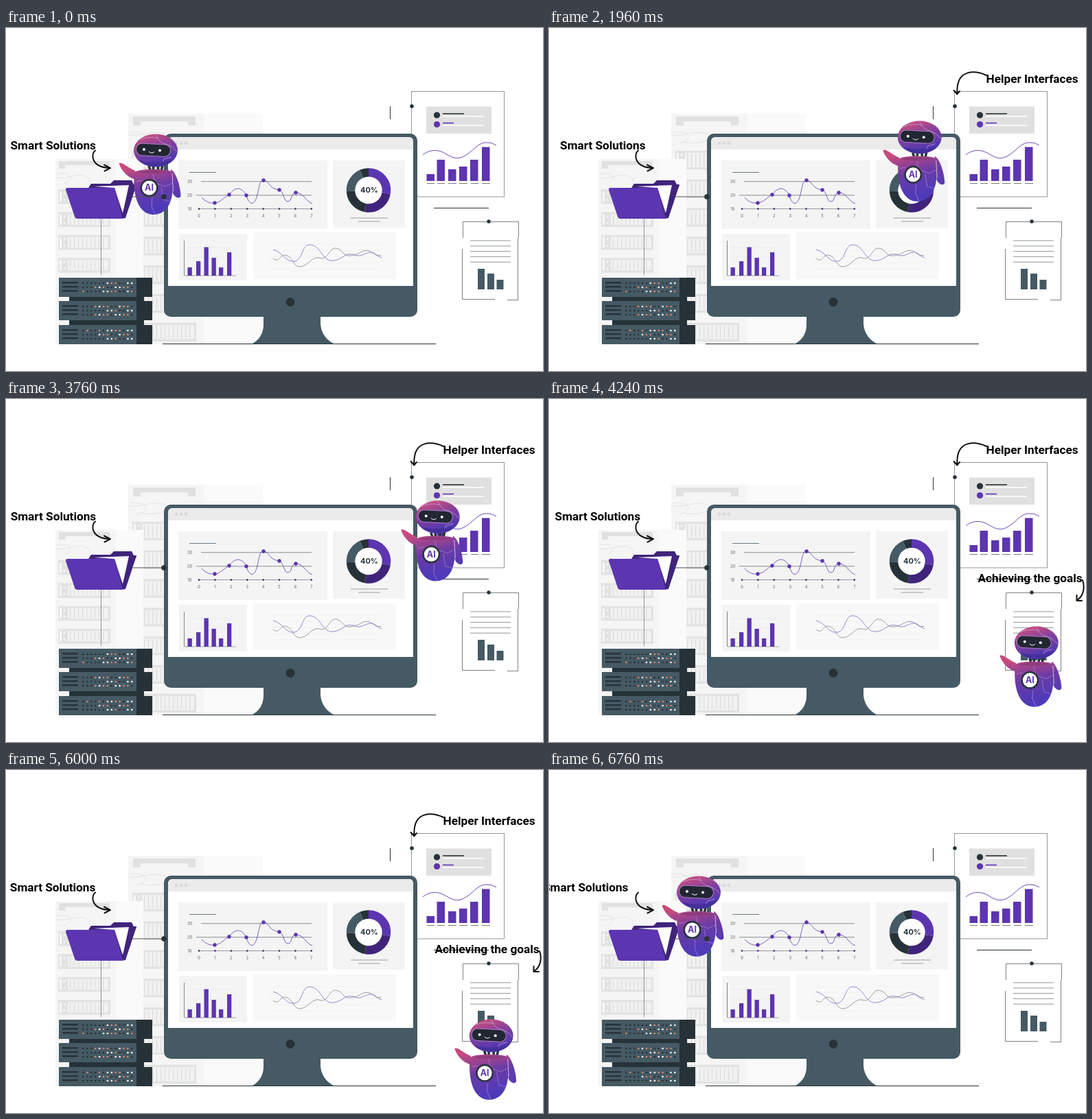
Animation of 782x500 px, one loop 6800 ms. Source, as an HTML page:

```html
<!DOCTYPE html>
<html lang="en">
<head>
<meta charset="utf-8">
<title>Smart Solutions</title>
<style>
  html, body { margin: 0; width: 100%; height: 100%; overflow: hidden; background: #fff; }
  svg { display: block; }
  .label { font: 700 17.2px Roboto, "Open Sans", sans-serif; fill: #000; }
  .tick { font: 500 5.6px Inter, sans-serif; fill: #6b777d; text-anchor: middle; }
  .bold { font: 700 11px Inter, sans-serif; text-anchor: middle; }
  .arrow { fill: none; stroke: #111; stroke-width: 2; stroke-linecap: round; stroke-linejoin: round; }
</style>
</head>
<body>
<svg id="stage" width="782" height="500" viewBox="0 0 782 500"></svg>
<script>
const SLATE = '#455a64', DARK = '#263238', PURPLE = '#5c35b0', DEEP = '#40247c';

const rect = (x, y, w, h, fill, more = '') =>
  `<rect x="${x}" y="${y}" width="${w}" height="${h}" fill="${fill}" ${more}/>`;
const dot = (x, y, r, fill = DARK) => `<circle cx="${x}" cy="${y}" r="${r}" fill="${fill}"/>`;
const fill = (d, color) => `<path d="${d}" fill="${color}"/>`;
const line = (d, color = DARK, width = 1) =>
  `<path d="${d}" fill="none" stroke="${color}" stroke-width="${width}"/>`;
const text = (x, y, s, cls, more = '') => `<text x="${x}" y="${y}" class="${cls}" ${more}>${s}</text>`;
const repeat = (n, f) => Array.from({ length: n }, (_, i) => f(i)).join('');
// each bar is [x, top]
const bars = (list, base, width, color) =>
  list.map(([x, top]) => rect(x, top, width, base - top, color)).join('');

function rackUnit(x, y, w, h) {
  const n = Math.floor((w - 25) / 6);
  return rect(x, y, w, h, '#e1e2e2') + rect(x + 2, y + 3, 3, h - 6, '#f7f7f7') +
    dot(x + 9, y + 6, 1.5, '#f7f7f7') + dot(x + 9, y + h - 6, 1.5, '#f7f7f7') +
    rect(x + 14, y + 3, w - 17, h - 6, '#f1f1f1') +
    repeat(n + 1, i => rect(x + 17 + i * 6, y + 4, 1.2, h - 8, '#dcdddd'));
}

function racks() {
  return rect(288, 125, 86, 336, '#fafafa') + rect(178, 125, 110, 336, '#f5f5f5') +
    fill('M185 129H276V142H265V136H196V142H185z', '#e0e1e1') +
    line('M180 152C205 147 212 164 190 168M178 156C200 158 212 148 232 154M196 166Q215 170 230 164', '#e4e4e4') +
    repeat(7, i => rackUnit(184, 179 + i * 41.8, 93, 27)) +
    rect(160, 191, 40, 270, '#fafafa') + rect(72, 191, 88, 270, '#f5f5f5') +
    fill('M77 194H151V205H142V200H86V205H77z', '#e0e1e1') +
    line('M74 213C95 208 100 222 84 227M73 218C92 222 108 207 122 220V236', '#e4e4e4') +
    repeat(4, i => rackUnit(76, 235 + i * 33.4, 76, 21.5));
}

function server(y, row) {
  return rect(77, y, 113, 28, SLATE) + rect(190, y, 23, 28, DARK) +
    repeat(3, i => rect(82, y + 6 + i * 6, 23, 2.4, DARK)) +
    repeat(39, i => {
      const c = i % 13, k = (i * 7 + row * 5 + (i >> 2)) % 9;
      const color = c < 4 || k < 3 ? (k === 8 ? '#ee7d66' : DARK) : k < 6 ? '#ee7d66' : '#fff';
      return dot(112.5 + c * 5.9, y + 8 + Math.floor(i / 13) * 6, 1.35, color);
    });
}

function servers() {
  return rect(92, 390, 109, 46, DARK) + [364, 398, 433].map(server).join('');
}

function folder() {
  return line('M138.5 278V360', '#8b9195') +
    fill('M120 233L124 227H152L157 222H183L186 228H190L174 277L166 278z', DEEP) +
    fill('M128 231L179 229L170 270L158 233z', '#fff') +
    line('M160 232L177 230.5', '#d8d8df', .8) +
    fill('M180 229H190C183 246 180 264 171 278L169 272C174 258 178 245 180 229z', DEEP) +
    fill('M89 233H155Q158 233 159 236L170 278H104Q101 278 100 275L87 236Q87 233 89 233z', PURPLE);
}

function monitor() {
  return fill('M375 415H458V432Q460 452 479 461H357Q375 452 375 432z', SLATE) +
    line('M228 460.5H626') +
    rect(230, 154, 369, 267, SLATE, 'rx="10"') +
    fill('M236 166Q236 159 243 159H586Q593 159 593 166V376H236z', '#fff') +
    fill('M236 177V166Q236 159 243 159H586Q593 159 593 166V177z', '#ebebeb') +
    [248, 255, 262].map(x => dot(x, 168, 2.4, '#dadada')).join('') +
    dot(414, 399.5, 6.5);
}

function lineChart() {
  const points = [[304, 255], [325, 243], [350, 244], [375, 222], [398, 236], [422, 240]];
  return rect(251, 193, 217, 100, '#f4f4f4') + line('M267 210.5H306', SLATE, .8) +
    line('M284 223.8H445M277 243.8H445', '#7d8488', .9) + line('M281 263.6H445', '#8b8b93', .9) +
    [30, 20, 10].map((n, i) => text(267.5, 226 + i * 20, n, 'tick')).join('') +
    repeat(8, i => text(281 + i * 23.4, 276, i, 'tick') + dot(281 + i * 23.4, 263.6, 1.3, DEEP)) +
    line('M285 247C290 253 297 256 304 255C313 254 317 247 325 243C334 230 344 232 350 244' +
      'C354 259 362 260 366 243C370 226 370 222 375 222C384 223 382 234 398 236' +
      'C405 238 404 254 411 253C417 252 414 241 422 240C434 240 436 253 446 256', PURPLE, .8) +
    points.map(([x, y]) => dot(x, y, 2.7, PURPLE)).join('');
}

function donut() {
  const parts = [[0, 100, PURPLE], [100, 190, DEEP], [190, 267, DARK], [267, 337, SLATE], [337, 360, DARK]];
  const at = a => {
    const r = a * Math.PI / 180;
    return `${528 + 26 * Math.sin(r)} ${236.5 - 26 * Math.cos(r)}`;
  };
  return rect(476, 193, 105, 98, '#f4f4f4') + dot(528, 236.5, 21, '#fff') +
    parts.map(([a, b, c]) => line(`M${at(a)}A26 26 0 0 1 ${at(b)}`, c, 12.5)).join('') +
    text(529, 240, '40%', 'bold', `fill="${DARK}"`) +
    line('M502 277H556M513 282H545', '#9a9fa2');
}

function smallCharts() {
  return rect(252, 300, 99, 68, '#f4f4f4') +
    line('M259.5 310V361', '#777', .9) + line('M260 361H335', '#9a9a9a', .9) +
    line('M264 320H335M264 334H335M264 348H335', '#ebebeb') +
    bars([[264.5, 349], [277, 340], [288.5, 319.5], [299.5, 335], [310, 349], [322, 327]], 361, 6.3, PURPLE) +
    rect(360, 298, 208, 68, '#f8f8f8') +
    repeat(5, i => line(`M383 ${315 + i * 9}H548`, '#f1f1f1')) +
    line('M389 323C404 327 407 342 420 340C433 338 430 315 443 316C459 317 460 341 477 339' +
      'C492 337 492 327 506 330C518 337 526 323 536 328Q542 333 547 335', '#8467c8', .8) +
    line('M389 336C399 343 397 331 407 331C418 333 418 349 429 348C441 346 445 333 456 335' +
      'C468 340 470 322 479 321C491 321 489 333 502 332C516 330 520 322 529 325C536 327 538 334 546 331', '#7f898e', .8);
}

function chartPage() {
  return line('M559.5 114V133') + line('M623 262.5H703') +
    rect(590.5, 92.5, 135, 153.5, '#fff', 'stroke="#777d81" stroke-width=".8"') +
    dot(591, 114, 2.8) +
    rect(612, 114.5, 95, 39.5, '#e0e0e0') + dot(627.5, 127, 4.6) + dot(627.5, 140.5, 4.6, PURPLE) +
    line('M636 125H667', DARK, 1.6) + line('M636 138.5H652', PURPLE, 1.6) +
    line('M636 128.8H696M636 142H696', '#fff', 1.6) +
    bars([[612.5, 213], [627.5, 192], [644, 206], [660, 202], [676, 192], [693, 173.5]], 223, 11.5, PURPLE) +
    line('M613 226.5H624M628 226.5H639M644 226.5H656M660 226.5H672M677 226.5H688M693 226.5H705', '#777') +
    line('M607 185C615 178 627 176 638 182C648 188 656 193 667 187C680 180 686 168 698 167Q707 166 714 171',
      PURPLE, .9);
}

function textPage() {
  return rect(665, 282, 81, 114, '#fff') +
    line('M665.5 306V282.5H746.5V306M745.5 306V396M664.5 322V395.5H712M730 396.5H746', '#5c6367', .8) +
    dot(703, 282, 2.7) +
    repeat(5, i => line(`M676 ${310 + i * 7.8}H735`, '#858b8e', .9)) +
    bars([[687, 351], [701, 358], [714.5, 367]], 381, 10, SLATE);
}

function robot() {
  const body = 'url(#body)';
  return fill('M164.5 197.5C168 194 175 202 188 208L190 221C181 220 169 211 164.5 197.5z', body) +
    fill('M240 206C247 209 254 230 254.5 245C252 250 246 247 243 241z', body) +
    line('M208 201L210 207M214.5 201V208M221.5 201V208M228 200L226.5 207', DARK, 3.5) +
    fill('M187 211Q190 206 214 206Q238 206 242 210C246 243 240 272 214 272C192 271 184 243 187 211z', body) +
    fill('M190 210.5Q214 204 240 210Q214 214 190 210.5z', '#8d3c7c') +
    line('M242 212L243.5 238', '#e4d9f2', .8) +
    line('M214 213L217 226L232 231L242 226M226 232L229 250L239 253M213 247L212 260L217 271M189 224L198 222',
      '#a58ad6', .7) +
    '<ellipse cx="218" cy="178.5" rx="32" ry="24" fill="url(#head)"/>' +
    line('M217 155C222 160 221 165 229 168C241 171 244 176 249 180M241 188L230 191L227 200M195 163Q208 157 222 161',
      '#c99bd2', .8) +
    fill('M194 193Q218 199 243 192Q235 202 218 202Q203 202 194 193z', '#44309c') +
    rect(189, 168.5, 51, 18.5, '#a97fc4', 'rx="9" transform="rotate(3 214 178)"') +
    rect(190, 169.5, 49, 16.5, '#222633', 'rx="8" transform="rotate(3 214 178)"') +
    dot(201, 177, 2, '#fff') + dot(224, 178.5, 2, '#fff') +
    line('M208 180Q212 184 216 180.5', '#fff', 1) +
    dot(208.5, 233, 13) + dot(208.5, 233, 10.5, '#fff') +
    text(208.5, 237.4, 'AI', 'bold', `fill="${PURPLE}" style="font-size:12.5px"`);
}

const gradient = (id, y1, y2, top, mid, low) =>
  `<linearGradient id="${id}" gradientUnits="userSpaceOnUse" x1="206" x2="220" y1="${y1}" y2="${y2}">
    <stop stop-color="${top}"/><stop offset=".5" stop-color="${mid}"/><stop offset="1" stop-color="${low}"/>
  </linearGradient>`;
const wipeClip = (id, x, y, h) => `<clipPath id="${id}"><rect x="${x}" y="${y}" width="0" height="${h}"/></clipPath>`;
const arrow = d => `<path class="arrow" d="${d}"/>`;

stage.innerHTML = `<defs>
  ${gradient('head', 154, 200, '#cf4f7d', '#7f3f9f', '#4b37b2')}
  ${gradient('body', 199, 262, '#c64a7e', '#6a3ba6', '#4f3ab8')}
  ${wipeClip('helperClip', 586, 55, 50)}${wipeClip('goalsClip', 622, 245, 55)}</defs>` +
  racks() + servers() + folder() + chartPage() + monitor() + lineChart() + donut() + smallCharts() +
  textPage() +
  `<g id="bot">${robot()}</g>` +
  line('M183 246H230', '#4c5358') + dot(230, 246, 3.8) +
  arrow('M130 178.5C123 184 124 203 151 204M143 199.5L152 204.2L143.5 208.5') +
  text(6.5, 177, 'Smart Solutions', 'label', 'id="smart"') +
  `<g clip-path="url(#helperClip)">${arrow('M637 69C622 62 592 58 594.5 96M589.5 91L594.5 96.5L598 92')}
    ${text(636.5, 80, 'Helper Interfaces', 'label')}</g>
  <g clip-path="url(#goalsClip)">${arrow('M777 264C781 275 778 288 769 293M768.5 286V294H776')}
    ${text(624.5, 267, 'Achieving the goals', 'label')}</g>`;

const LOOP = 6800, STEP = 40, MOVE = 780;
const spots = [[0, 0], [403, -24], [510, 218]];
// lead: progress already made on the first step; drift: how far the first label slides before it snaps back
const moves = [
  { start: 1480, lead: 36, drift: 12 },
  { start: 3760, lead: 60, drift: 2.5 },
  { start: 6000, lead: 36, drift: -15.5 },
];
const bot = document.getElementById('bot'), smart = document.getElementById('smart');
const helperBox = document.querySelector('#helperClip rect'), goalsBox = document.querySelector('#goalsClip rect');
const clamp = v => Math.max(0, Math.min(1, v));
const ease = u => 0.85 * u * (1 - u) ** 2 + u * u * (3 - 2 * u);

function draw(now) {
  const t = Math.floor(now % LOOP / STEP) * STEP;
  let [x, y] = spots[0], shift = 0;
  moves.forEach(({ start, lead, drift }, i) => {
    if (t < start) return;
    const p = ease(clamp((t - start + lead) / MOVE));
    const a = spots[i], b = spots[(i + 1) % 3];
    x = a[0] + (b[0] - a[0]) * p;
    y = a[1] + (b[1] - a[1]) * p;
    shift = t < start + 800 ? drift * p : 0;
  });
  bot.setAttribute('transform', `translate(${x} ${y})`);
  smart.setAttribute('x', 6.5 + shift);
  const out = clamp((t - 6000) / 680);
  const wipe = start => 200 * Math.min(clamp((t - start) / 440), 1 - out);
  helperBox.setAttribute('width', wipe(1480));
  goalsBox.setAttribute('width', wipe(3760));
}

const begin = performance.now();
function tick() {
  draw(performance.now() - begin);
  requestAnimationFrame(tick);
}
tick();
</script>
</body>
</html>
```
